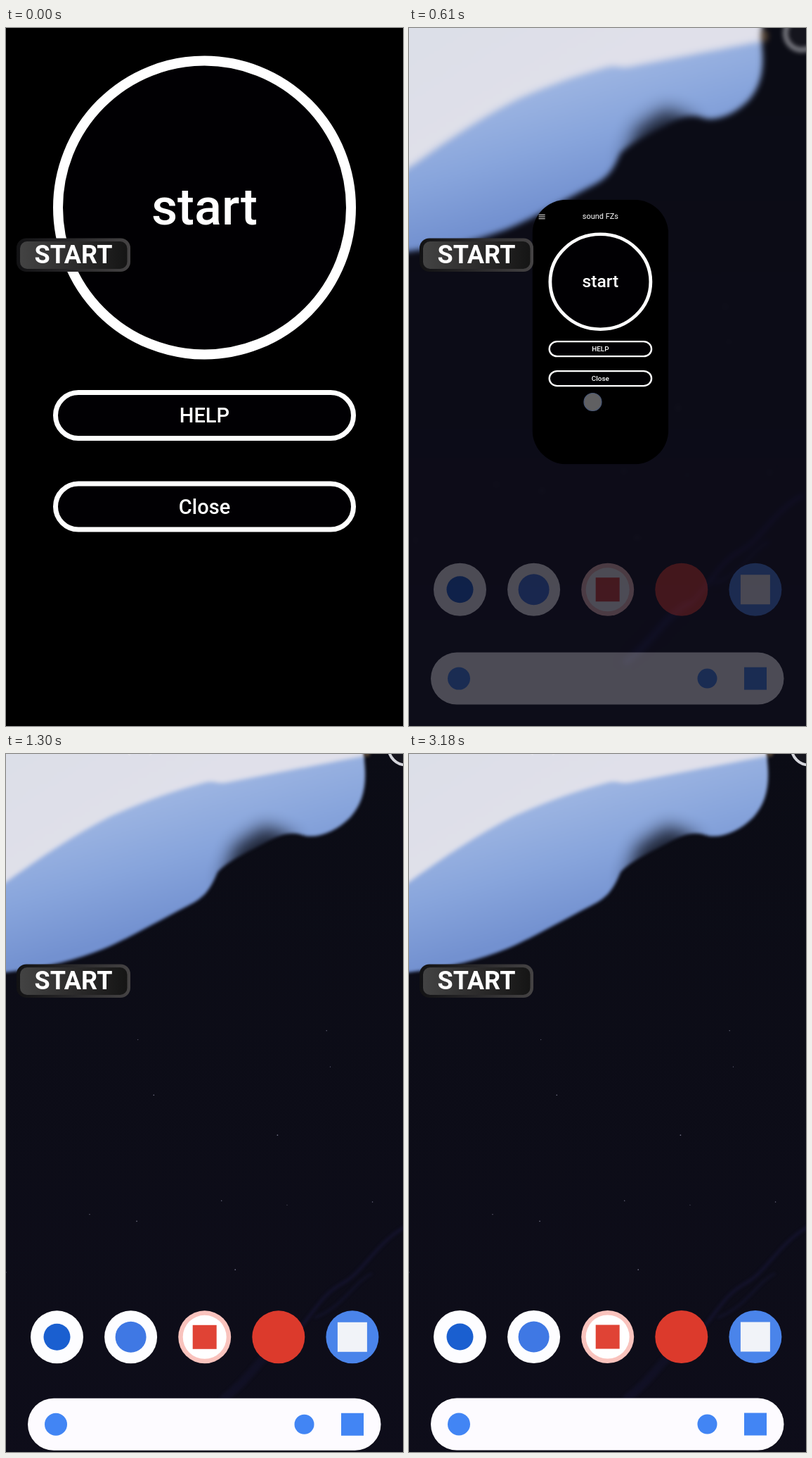
Write an HTML page that moves like this. It is 565 px wide and 991 px high and loops after 3.21 s.

```html
<!DOCTYPE html>
<html lang="en">
<head>
<meta charset="utf-8">
<title>Home gesture</title>
<style>
  html, body { margin: 0; width: 100%; height: 100%; overflow: hidden; background: #000; }
  svg { display: block; width: 565px; height: 991px; }
  text { font-family: Roboto, "Liberation Sans", sans-serif; font-weight: 500; fill: #fff; text-anchor: middle; }
</style>
</head>
<body>
<svg viewBox="0 0 565 991">
  <defs>
    <filter id="haze" filterUnits="userSpaceOnUse" x="-70" y="-70" width="705" height="1131" color-interpolation-filters="sRGB">
      <feGaussianBlur id="hazeBlur" stdDeviation="0"/>
    </filter>
    <filter id="soft" filterUnits="userSpaceOnUse" x="-90" y="-90" width="745" height="1171" color-interpolation-filters="sRGB"><feGaussianBlur stdDeviation="2"/></filter>
    <filter id="softer" filterUnits="userSpaceOnUse" x="-90" y="-90" width="745" height="1171" color-interpolation-filters="sRGB"><feGaussianBlur stdDeviation="12"/></filter>
    <linearGradient id="night" x1="0" y1="0" x2="0" y2="1">
      <stop offset="0" stop-color="#0b0c15"/><stop offset="1" stop-color="#0e0d1a"/>
    </linearGradient>
    <linearGradient id="blue" gradientUnits="userSpaceOnUse" x1="180" y1="70" x2="230" y2="240">
      <stop offset="0" stop-color="#9db5e2"/><stop offset=".5" stop-color="#88a5dc"/><stop offset="1" stop-color="#7391d0"/>
    </linearGradient>
    <linearGradient id="pale" gradientUnits="userSpaceOnUse" x1="0" y1="0" x2="90" y2="150">
      <stop offset="0" stop-color="#dcdfe8"/><stop offset="1" stop-color="#e0e0ea"/>
    </linearGradient>
    <linearGradient id="rim"><stop offset="0" stop-color="#121214"/><stop offset=".5" stop-color="#29282a"/><stop offset="1" stop-color="#454344"/></linearGradient>
    <linearGradient id="face"><stop offset="0" stop-color="#434343"/><stop offset=".45" stop-color="#2f2e2e"/><stop offset="1" stop-color="#151515"/></linearGradient>
    <clipPath id="lit"><path d="M-80 -80H510V10C514 45 508 70 490 90C470 110 445 120 425 116C410 110 395 112 375 122C345 138 315 152 301 168C290 195 280 205 260 215C200 246 160 270 125 282C85 297 40 305 0 310L-80 322Z"/></clipPath>
    <clipPath id="frame"><rect id="frameBox" width="565" height="1161"/></clipPath>
  </defs>

  <g id="paper">
    <g filter="url(#haze)">
      <rect x="-80" y="-80" width="725" height="1151" fill="url(#night)"/>
      <g filter="url(#soft)">
        <g clip-path="url(#lit)">
          <rect x="-80" y="-80" width="600" height="410" fill="url(#blue)"/>
          <path filter="url(#soft)" fill="url(#pale)" d="M-80 232L0 182C50 146 100 113 150 88C200 66 240 52 285 40C295 38 300 42 312 41C380 28 440 16 520 1V-80H-80Z"/>
          <path filter="url(#softer)" fill="#0d0f1a" opacity=".85" d="M306 185L325 130L368 102L412 118L380 190Z"/>
        </g>
      </g>
      <ellipse cx="514" cy="-5" rx="5" ry="9" fill="#5c4a38" filter="url(#soft)"/>
      <circle cx="569" cy="-9" r="24.5" fill="#15151d" stroke="#d5d6dc" stroke-width="4"/>
      <g filter="url(#soft)" fill="none" stroke="#23225a" stroke-linecap="round">
        <path stroke-width="4" opacity=".35" d="M570 670C525 695 510 735 478 752S435 800 405 830"/>
        <path stroke-width="3" opacity=".3" d="M520 738C495 750 480 785 440 800"/>
        <path stroke-width="12" opacity=".18" d="M400 830C365 850 350 885 310 915"/>
      </g>
      <g id="stars" fill="#6c6c80"></g>
    </g>
  </g>

  <g id="home">
    <g id="icons">
      <g fill="none" stroke="#e6e6ec" stroke-width="1.5">
        <path d="M76 -1H92M140 -1H157"/>
        <path d="M172 -3Q173 0 177 1.5M187 -2V0M209 -3Q208 0 204 1.5"/>
      </g>
    </g>
    <g id="search">
      <rect x="31" y="914.5" width="502.5" height="74" rx="37" fill="#fdfbff"/>
      <circle cx="71" cy="951.5" r="16" fill="#4285f4"/>
      <circle cx="424.5" cy="951.5" r="14" fill="#4285f4"/>
      <rect x="477" y="935.5" width="32" height="32" fill="#4285f4"/>
    </g>
  </g>

  <g id="app">
    <g clip-path="url(#frame)">
      <rect width="565" height="1161"/>
      <path d="M26.5 66.5H53M26.5 75H53M26.5 83.5H53" stroke="#eee" stroke-width="3"/>
      <text x="282.5" y="85.5" font-size="32" style="font-weight:400">sound FZs</text>
      <g transform="translate(565 0) rotate(45)">
        <rect x="-90" y="33" width="180" height="24" fill="#86332f"/>
        <text y="50" font-size="14.5" style="font-weight:700">DEBUG</text>
      </g>
      <g fill="#010003" stroke="#fff">
        <circle cx="282.5" cy="360" r="208.5" stroke-width="14"/>
        <rect x="70.5" y="622.5" width="424" height="65" rx="32.5" stroke-width="7"/>
        <rect x="70.5" y="752" width="424" height="65" rx="32.5" stroke-width="7"/>
      </g>
      <text x="282.5" y="384" font-size="72">start</text>
      <text x="282.5" y="664.5" font-size="29">HELP</text>
      <text x="282.5" y="794.5" font-size="29">Close</text>
      <rect id="handle" x="204.5" y="1141" width="156" height="6" rx="3" fill="#f4f4f4"/>
    </g>
  </g>

  <circle id="touch" r="12.5" fill="#b4b4b8" stroke="#8ba6e0" stroke-width="1.2"/>

  <rect x="15" y="298.5" width="162" height="47.5" rx="14" fill="url(#rim)"/>
  <rect x="20" y="303" width="152.5" height="39" rx="10" fill="url(#face)"/>
  <text x="96" y="334" font-size="36" style="font-weight:700">START</text>
</svg>

<script>
const LOOP = 3210, DRAG = 120, RELEASE = 550, LANDED = 730;
const $ = id => document.getElementById(id);
const set = (id, name, value) => $(id).setAttribute(name, value);
const ramp = (t, from, to) => Math.min(1, Math.max(0, (t - from) / (to - from)));
const mix = (a, b, k) => a + (b - a) * k;
const smooth = k => k * k * (3 - 2 * k);

function add(parent, tag, attrs) {
  const el = document.createElementNS("http://www.w3.org/2000/svg", tag);
  for (const k in attrs) el.setAttribute(k, attrs[k]);
  $(parent).append(el);
}

// Each app: plate colour, mark shape, mark size, mark colour.
const apps = [
  ["#fdfdff", "circle", 38, "#1a5fd0"],
  ["#fdfdff", "circle", 44, "#3f78e4"],
  ["#fff", "rect", 34, "#e04335"],
  ["#dc3a2c"],
  ["#4a84ea", "rect", 42, "#f1f3f8"]
];
apps.forEach(([plate, shape, size, fill], i) => {
  const cx = 72.5 + 105.1 * i, cy = 827.5, suggested = i === 2;
  if (suggested) add("icons", "circle", { cx, cy, r: 37.5, fill: "#f9c3bd" });
  add("icons", "circle", { cx, cy, r: suggested ? 31 : 37.5, fill: plate });
  if (shape === "circle") add("icons", shape, { cx, cy, r: size / 2, fill });
  if (shape === "rect") add("icons", shape, { x: cx - size / 2, y: cy - size / 2, width: size, height: size, fill });
});

let seed = 7;
const random = () => (seed = seed * 16807 % 2147483647) / 2147483647;
for (let i = 0; i < 12; i++) {
  add("stars", "circle", { cx: 565 * random(), cy: 340 + 430 * random(), r: .5 + .4 * random() });
}

// The window shrinks with the finger, then arcs down into its icon.
function drawApp(pull, fly) {
  const scale = 1 - .537 * pull;
  const sx = scale - .318 * fly ** .9;
  const sy = scale - .39 * fly ** .95;
  const x = 282.5 - 5.6 * pull - 24.5 * fly + 33 * fly * fly;
  const y = 475.5 - 35.6 * pull - 193 * fly + 497 * fly * fly;
  const corner = 22 + 13 * pull + 62 * fly * (1 - fly);
  set("app", "transform", `translate(${x} ${y}) scale(${sx} ${sy}) translate(-282.5 -580.5)`);
  set("app", "opacity", 1 - ramp(fly, .38, .98));
  set("frameBox", "rx", corner / sx);
  set("frameBox", "ry", corner / sy);
}

// Damped spring that brings the home screen into place.
function spring(t) {
  const u = Math.max(0, t - 510);
  return -66.4 * Math.exp(-.00685 * u) * Math.cos(.004245 * u);
}

function draw(t) {
  const pull = ramp(t, DRAG, RELEASE) ** 1.72;
  drawApp(pull, ramp(t, RELEASE, LANDED));
  set("handle", "opacity", 1 - ramp(t, 420, 540));

  set("touch", "transform", `translate(${mix(284, 261.5, pull ** 1.3)} ${mix(1050, 531, pull)})`);
  set("touch", "opacity", .85 * (1 - ramp(t, 510, 780)));

  const zoom = mix(.957, 1, smooth(ramp(t, 500, 880)));
  set("paper", "transform", `translate(282.5 475) scale(${zoom}) translate(-282.5 -475)`);
  set("hazeBlur", "stdDeviation", 8 * (1 - ramp(t, 450, 900)) ** 1.5);

  set("home", "opacity", ramp(t, 545, 795));
  set("icons", "transform", `translate(0 ${spring(t)})`);
  set("search", "transform", `translate(0 ${spring(t + 9)})`);
}

const begin = performance.now();
function tick() {
  draw((performance.now() - begin) % LOOP);
  requestAnimationFrame(tick);
}
tick();
</script>
</body>
</html>
```
